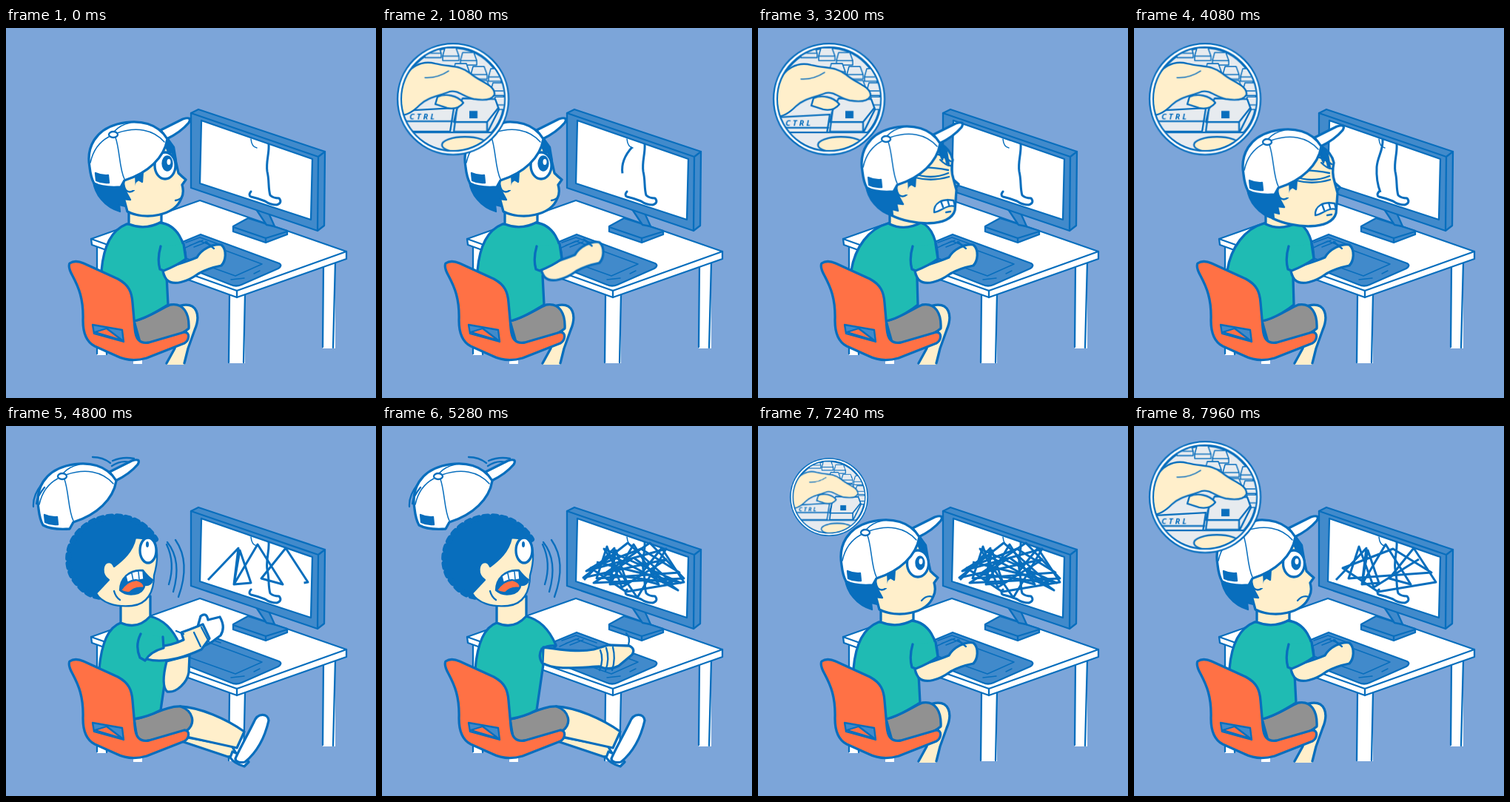
An HTML page that plays this animation: 500x500 px, repeating every 8 s.

```html
<!DOCTYPE html>
<html lang="en">
<head>
<meta charset="utf-8">
<title>Undo</title>
<style>
html, body { margin: 0; height: 100%; overflow: hidden; background: #7ca5d9; }
svg { display: block; width: 100vw; height: 100vh; fill: none; stroke: #086ebd; stroke-width: 3.3; stroke-linejoin: round; stroke-linecap: round; }
.white { fill: #fff; }
.skin { fill: #ffefcb; }
.ink { fill: #086ebd; }
.gear { fill: #418acb; }
.teal { fill: #1fbbb3; }
.grey { fill: #919191; }
.chair { fill: #ff7145; }
.key { fill: #e7ebef; }
.thin { stroke-width: 2.3; }
.fine { stroke-width: 1.5; }
.bare { stroke: none; }
text { font: italic bold 11px "Open Sans", sans-serif; fill: #086ebd; stroke: none; }

/* Poses switch hard, everything shares one 8 s clock */
.pose { opacity: 0; animation: 8s step-end infinite; }
.calm { animation-name: calm; }
.worried { animation-name: worried; }
.mad { animation-name: mad; }
.panic { animation-name: panic; }
.glum { animation-name: glum; }
.upright { animation-name: upright; }
.lean { animation-name: lean; }
.seated { animation-name: seated; }
.armsUp { animation-name: armsUp; }
.armsDown { animation-name: armsDown; }
.rush { animation-name: rush; }
@keyframes calm { 0% { opacity: 1 } 15% { opacity: 0 } }
@keyframes worried { 0%, 40% { opacity: 0 } 15%, 89.5% { opacity: 1 } }
@keyframes mad { 0%, 56% { opacity: 0 } 40% { opacity: 1 } }
@keyframes panic { 0%, 70% { opacity: 0 } 56% { opacity: 1 } }
@keyframes glum { 0%, 89.5% { opacity: 0 } 70% { opacity: 1 } }
@keyframes upright { 0%, 70% { opacity: 1 } 15% { opacity: 0 } }
@keyframes lean { 0%, 56% { opacity: 0 } 15% { opacity: 1 } }
@keyframes seated { 0%, 70% { opacity: 1 } 56% { opacity: 0 } }
@keyframes armsUp { 0%, 58%, 62%, 65.5% { opacity: 0 } 56%, 60%, 64% { opacity: 1 } }
@keyframes armsDown { 0%, 60%, 64%, 70% { opacity: 0 } 58%, 62%, 65.5% { opacity: 1 } }
@keyframes rush { 0%, 66.5% { opacity: 0 } 58.5% { opacity: 1 } }

.head { animation: head 8s linear infinite; }
@keyframes head {
  0%, 14.5% { transform: none }
  15.5%, 39% { transform: translate(21px, 2px) }
  41%, 45.5%, 47%, 48.5%, 50%, 51%, 52.5%, 54%, 55.5%, 69.99% { transform: translate(35px, 10px) }
  46%, 48%, 49.5%, 52%, 53.5%, 55% { transform: translate(36px, 11px) }
  70%, 89% { transform: translate(-2px, 1px) }
  90.5%, 100% { transform: none }
}
/* Relative to the leaning head */
.cap { animation: fly 8s linear infinite; }
@keyframes fly {
  0%, 56% { transform: none; animation-timing-function: ease-out }
  59%, 66.5% { transform: translate(-104px, -86px); animation-timing-function: ease-in }
  69.99% { transform: translate(-37px, -9px) }
  70%, 100% { transform: none }
}

.arm { animation: arm 8s ease-in-out infinite; }
@keyframes arm {
  0%, .5%, 2%, 12%, 14.5%, 23.5%, 26%, 35%, 37%, 41%, 42.5%, 46%, 48.5%, 53.5%, 55%, 100% { transform: none }
  1.2%, 13.2%, 24.7%, 36%, 41.7%, 47.2%, 54.2% { transform: translate(3px, -4px) }
}

.draw { stroke-linecap: butt; stroke-dasharray: 1 2; stroke-dashoffset: 1.02; animation: 8s linear infinite; }
.tryA { animation-name: tryA; }
.tryB { animation-name: tryB; }
.tryC { animation-name: tryC; }
.scrawl { animation-name: scrawl; }
.tangle { animation-name: tangle; }
@keyframes tryA {
  0%, .5%, 10.51%, 12%, 18.51%, 53.5%, 56.51%, 100% { stroke-dashoffset: 1.02 }
  2%, 10.5%, 14.5%, 18.5%, 55%, 56.5% { stroke-dashoffset: 0 }
}
@keyframes tryB {
  0%, 23.5%, 31.01%, 41%, 45.01%, 100% { stroke-dashoffset: 1.02 }
  26%, 31%, 42.5%, 45% { stroke-dashoffset: 0 }
}
@keyframes tryC {
  0%, 35%, 39.51%, 46%, 52.51%, 100% { stroke-dashoffset: 1.02 }
  37%, 39.5%, 48.5%, 52.5% { stroke-dashoffset: 0 }
}
@keyframes scrawl {
  0%, 57% { stroke-dashoffset: 1.02 }
  60% { stroke-dashoffset: .53 }
  63%, 100% { stroke-dashoffset: 0 }
}
@keyframes tangle {
  0%, 63% { stroke-dashoffset: 1.02 }
  66%, 92.5% { stroke-dashoffset: 0; animation-timing-function: step-end }
  93% { stroke-dashoffset: .25; animation-timing-function: step-end }
  95% { stroke-dashoffset: .5; animation-timing-function: step-end }
  97% { stroke-dashoffset: .75; animation-timing-function: step-end }
  99%, 100% { stroke-dashoffset: 1.02 }
}

.bubble { transform-origin: 96px 96px; animation: bubble 8s linear infinite; }
@keyframes bubble {
  0%, 7.5%, 57.5%, 89.5% { transform: scale(0) }
  9%, 91% { transform: scale(1.03) }
  9.5%, 56%, 91.5%, 100% { transform: none }
}
.ctrl { --drop: 9px; animation: press 8s linear infinite; }
.hand { --drop: 2px; animation: press 8s linear infinite; }
@keyframes press {
  0%, 10%, 11.5%, 18%, 19.5%, 30%, 32.5%, 38.5%, 40.5%, 44%, 45.5%, 51.5%, 53.5%, 92%, 94%, 96%, 98% { transform: none }
  10.5%, 11%, 18.5%, 19%, 30.8%, 31.7%, 39%, 40%, 44.5%, 45%, 52%, 53%, 92.6%, 93.4%, 94.6%, 95.4%, 96.6%, 97.4%, 98.6%, 100% { transform: translateY(var(--drop)) }
}
</style>
</head>
<body>
<svg viewBox="0 0 500 500" preserveAspectRatio="none">
  <defs>
    <clipPath id="lens"><circle cx="96" cy="96" r="69"/></clipPath>
    <path id="cap" d="M3 0H18L22 11V17H0V11ZM0 11H22"/>
  </defs>

  <g id="table" class="thin">
    <path class="white bare" d="M123 290H136V442H123ZM172 440H184V454H172ZM301 355H323V453H301ZM428 310H445V433H428Z"/>
    <path d="M123 296V440M136 296V441M302 360L301 452M323 360L321 452M429 318L428 431M445 316L442 432"/>
    <path class="white" d="M115 285L262 233L460 302V312L312 364L116 293Z"/>
    <path d="M115 285L312 355L460 302M312 355V364"/>
  </g>

  <g id="tablet" class="thin">
    <path class="gear" d="M222 296L263 279L369 318Q374 321 368 325L318 347Q311 350 304 347L225 316Z"/>
    <path class="fine" d="M240 298L262 288L346 319L310 335L243 311M243 290L262 283L290 293M248 294L266 287M254 296L272 289M335 332L343 328M304 340L322 338"/>
  </g>

  <g id="monitor" class="thin">
    <path class="gear" d="M307 268L327 257L380 274V279L351 290L307 275Z"/>
    <path d="M307 269L351 284L380 275M351 284V289"/>
    <path class="gear" d="M336 242L352 266L363 268L354 248Z"/>
    <path class="gear" d="M250 115L260 110L431 167L430 267L421 274L250 216Z"/>
    <path d="M250 115L422 174L431 167M422 174L421 273"/>
    <path class="white" d="M264 125L414 177L412 259L262 210Z"/>
    <g stroke-width="3">
      <path class="fine" d="M331 150Q332 161 339 162"/>
      <path d="M355 157C356 170 351 180 353 194C356 206 354 216 357 226Q361 230 369 230Q374 236 366 239Q357 239 350 234Q340 230 331 228Q327 226 331 221"/>
      <path class="draw tryA" pathLength="1" d="M338 161C328 172 323 184 325 197Q328 210 331 222"/>
      <path class="draw tryB" pathLength="1" d="M336 160C322 167 318 182 321 197Q329 208 331 222"/>
      <path class="draw tryC" pathLength="1" d="M336 151C337 165 329 174 328 188Q327 207 333 222"/>
      <path class="draw scrawl" pathLength="1" d="M273 208L314 165L308 214L331 212L316 168L308 214L340 160L374 214L345 206L378 165L408 211L330 224L282 192L350 166L402 198L290 206L304 163L324 218L385 180"/>
      <path class="draw tangle" pathLength="1" d="M385 180L272 205L332 158L392 212L300 200L362 158L408 206L286 212L340 178L400 222L310 175L276 196L384 166L345 232L300 166L404 212L290 184"/>
    </g>
  </g>

  <g id="legs">
    <g class="pose seated">
      <path class="skin bare" d="M236 375C259 370 263 389 255 408L246 433L242 455H217L230 432Z"/>
      <path d="M236 375C259 370 263 389 255 408L246 433L241 453M217 453L228 433"/>
      <path class="grey" d="M173 396C192 392 208 380 222 374C240 371 248 386 247 406C236 416 208 426 182 428Z"/>
    </g>
    <g class="pose panic">
      <path class="skin" d="M240 420L305 432L313 446L300 447L240 427Z"/>
      <path class="white" d="M306 440Q322 446 328 454L322 460Q308 456 303 448Z"/>
      <path class="skin" d="M235 379C262 380 298 396 322 413L312 435L244 420Z"/>
      <path class="white" d="M311 447C317 434 326 418 335 400C340 387 354 388 355 398C350 420 340 440 323 454C313 456 308 452 311 447Z"/>
      <path class="grey" d="M173 396C195 393 216 378 236 379C253 385 257 402 244 412C222 417 202 426 178 427Z"/>
    </g>
  </g>

  <g id="body">
    <g class="pose upright">
      <g class="pose seated">
        <path class="teal" d="M163 265C145 272 132 292 129 328L152 380L173 396C192 392 210 379 219 374L217 335L243 312C242 290 232 266 208 263Z"/>
        <path class="skin" d="M166 244V265Q188 274 210 262V244Z"/>
      </g>
    </g>
    <g class="pose lean">
      <path class="teal" d="M176 264C150 271 131 296 126 328L152 380L173 396C192 392 210 379 216 374L215 338L243 312C242 290 236 268 220 263Z"/>
      <path class="skin" d="M178 250V265Q199 275 222 262V244Z"/>
    </g>
    <g class="pose panic">
      <path class="teal" d="M155 266C138 272 129 294 126 328L152 380L173 396Q192 393 209 384L218 322L235 296C226 275 212 261 194 257Z"/>
      <path class="skin" d="M155 232V266Q178 276 195 257V230Z"/>
    </g>
    <g class="pose seated">
      <g class="arm">
        <path class="skin" d="M212 326C226 321 244 316 258 310C264 299 280 291 291 293C299 300 297 315 291 321C281 323 270 326 260 332C245 343 226 349 217 340Q212 333 212 326Z"/>
        <path class="thin" d="M270 289L281 298"/>
      </g>
      <path class="teal" d="M209 295Q204 312 208 326L213 328Q231 321 243 312L240 292"/>
    </g>
    <g class="pose armsUp">
      <path class="skin" d="M217 318C212 338 211 353 218 359C231 361 245 346 247 333L248 310Z"/>
      <path class="white" d="M263 257Q271 251 273 262L289 258Q297 272 290 283L278 292L262 300L256 282Z"/>
      <path class="skin" d="M188 296C205 300 223 297 240 289L237 279L248 275L266 268L275 287L264 302C240 313 212 321 190 315Z"/>
      <path class="thin" d="M264 272L274 291M254 279L263 298M230 277L240 281"/>
      <path class="teal" d="M182 281Q174 297 181 313L188 317Q195 305 213 300L212 285"/>
    </g>
    <g class="pose armsDown">
      <path class="skin" d="M218 299C240 302 266 306 286 302L306 296L334 297Q343 301 338 309L320 324Q306 331 294 325C269 326 232 331 217 320Z"/>
      <path class="thin" d="M295 303Q300 315 294 330M303 300Q308 314 302 331M312 299Q316 314 311 330M333 296Q336 286 330 280"/>
      <path class="teal" d="M216 301Q210 311 217 321M216 301Q224 296 235 297"/>
    </g>
  </g>

  <g id="seat">
    <path class="chair" d="M86 318C92 314 98 315 105 318L151 339C166 347 170 357 171 371L174 405C175 420 180 427 193 425L241 411C249 411 248 422 241 426L190 446C176 450 161 449 149 443L120 430C108 424 104 411 104 395C105 366 98 350 90 335C86 328 84 322 86 318Z"/>
    <path class="gear thin" d="M117 401L157 408L159 424L119 413Z"/>
    <path class="chair thin" d="M120 411L136 406L157 422Z"/>
  </g>

  <g class="head">
    <g class="pose seated">
      <path class="skin" d="M150 196L218 150C226 160 229 178 233 196Q238 201 243 205L238 212Q241 222 237 230C228 254 188 260 164 248Z"/>
      <g class="pose mad">
        <path class="skin" d="M150 196L218 150Q232 158 235 172Q232 186 236 198L240 213L238 240C232 264 180 261 152 247Z"/>
      </g>
      <path class="ink thin" d="M118 207C120 224 133 242 154 248L153 239L161 241L159 231L168 232L162 221L173 213L175 208L179 205L184 208L185 193L200 176L150 180ZM214 155L221 172L223 166L230 179L227 161L219 150Z"/>
      <path class="skin thin" d="M172 199C161 195 156 209 162 219Q167 224 173 219"/>
      <path class="skin bare" d="M170 200L174 199L175 219H170Z"/>
      <g class="pose mad">
        <path class="thin" d="M177 184Q200 180 229 186M181 190Q205 200 229 190M184 196Q207 202 230 195M206 163Q220 164 232 174M218 172Q227 181 233 180M217 160Q226 166 227 177"/>
        <path class="white thin" d="M210 243C209 231 220 224 236 227L238 235C227 232 219 242 210 243Z"/>
        <path class="thin" d="M219 228L222 236M228 226L230 233M226 243L232 242"/>
      </g>
      <g class="pose calm">
        <ellipse class="white" cx="215" cy="186" rx="14" ry="18"/>
        <ellipse class="ink" cx="218" cy="183" rx="6" ry="9"/>
        <ellipse class="white bare" cx="220" cy="181" rx="2.5" ry="4"/>
        <path class="thin" d="M229 233Q235 232 238 228"/>
      </g>
      <g class="pose worried">
        <ellipse class="white" cx="216" cy="186" rx="14.5" ry="18"/>
        <ellipse class="ink" cx="219" cy="185" rx="5" ry="8"/>
        <ellipse class="white bare" cx="220" cy="183" rx="2.5" ry="4"/>
        <path class="thin" d="M221 236Q228 228 236 231M207 162L220 158"/>
      </g>
      <g class="pose glum">
        <path class="thin white" d="M192 184Q205 175 219 179Q224 186 217 189Q202 191 192 184Z"/>
        <path class="thin" d="M188 178Q207 170 225 176M190 191Q207 198 222 192M198 183L218 183M206 241Q213 233 227 237"/>
      </g>
    </g>
  </g>

  <g class="pose panic">
    <path class="ink" stroke-width="8" stroke-dasharray="5 7" d="M138 123C166 119 189 132 202 153L176 166L150 189L134 231C112 232 101 219 92 207C81 190 80 164 99 143Q115 126 138 123Z"/>
    <path class="skin thin" d="M146 190C158 181 171 170 175 151L199 153C207 168 204 188 200 202C200 224 191 241 170 243C148 245 129 239 122 226L139 208C128 201 130 184 139 184Q144 184 146 190Z"/>
    <ellipse class="white" cx="192" cy="168" rx="11" ry="17"/>
    <ellipse class="ink bare" cx="191" cy="160" rx="2" ry="4"/>
    <path class="ink thin" d="M154 222C154 207 166 193 185 195Q192 204 198 208Q196 216 187 215C186 229 164 231 154 222Z"/>
    <path class="white fine" d="M162 203Q173 194 185 196L186 207L164 211ZM170 199L172 209M179 197L180 207"/>
    <path class="chair thin" d="M155 222Q163 209 176 208Q189 212 186 219Q174 217 167 225Q160 226 155 222Z"/>
    <path class="thin" d="M146 223Q148 231 154 235M217 160Q229 185 220 214M218 157Q238 182 226 224M229 154Q250 184 233 231"/>
  </g>

  <g class="head">
    <g class="cap">
      <path class="white" d="M209 138L239 123Q252 119 247 128Q236 141 217 150Z"/>
      <path class="white" d="M113 188C108 160 122 138 150 130C182 122 206 130 218 150C214 175 192 196 160 206L155 215C140 216 126 214 119 210C115 203 114 197 113 188Z"/>
      <path class="fine" d="M148 148C154 165 153 190 160 204M150 142C176 133 199 137 214 154M139 147C124 155 117 168 114 182M146 140Q154 131 168 128"/>
      <ellipse class="white thin" cx="145" cy="144" rx="6" ry="4"/>
      <path class="ink thin" d="M121 196Q130 200 138 199L139 209Q130 210 122 206Z"/>
    </g>
  </g>
  <path class="pose rush thin" d="M117 42Q131 42 141 50M144 47Q158 41 173 44M143 54Q155 46 167 49M48 79Q36 94 37 109M52 83Q42 95 41 105"/>

  <g class="bubble">
    <circle class="white thin" cx="96" cy="96" r="75"/>
    <circle class="key" cx="96" cy="96" r="69.5"/>
    <g clip-path="url(#lens)" class="thin">
      <g class="key fine">
        <use href="#cap" x="58" y="23"/><use href="#cap" x="82" y="27"/><use href="#cap" x="106" y="33"/>
        <use href="#cap" x="96" y="48"/><use href="#cap" x="120" y="52"/><use href="#cap" x="144" y="55"/>
        <use href="#cap" x="124" y="71"/><use href="#cap" x="147" y="74"/><use href="#cap" x="150" y="93"/>
      </g>
      <path class="key" d="M101 110L109 95L153 96L158 110L143 140H97Z"/>
      <path d="M101 110L97 127L142 127L157 108M142 127V139"/>
      <rect class="ink bare" x="118" y="112" width="11" height="10"/>
      <g class="ctrl">
        <path class="key" d="M25 112L97 108L92 140H25Z"/>
        <path d="M25 126H95"/>
        <text x="37" y="123" letter-spacing="3">CTRL</text>
      </g>
      <path class="key bare" d="M20 141H170V180H20Z"/>
      <path d="M25 141H160"/>
      <ellipse class="skin" cx="112" cy="158" rx="31" ry="11"/>
      <g class="hand">
        <path class="skin" d="M75 93C86 88 102 91 110 101Q102 111 88 108L72 103Z"/>
        <path class="skin" d="M10 82L28 72C35 53 53 43 72 48C94 53 105 50 119 61C134 74 153 77 152 90C148 98 136 98 124 96C110 93 102 83 91 86C76 92 61 94 51 104C43 112 35 118 20 119Z"/>
        <path class="fine" d="M58 67Q75 68 90 58"/>
      </g>
    </g>
  </g>
</svg>
</body>
</html>
```
